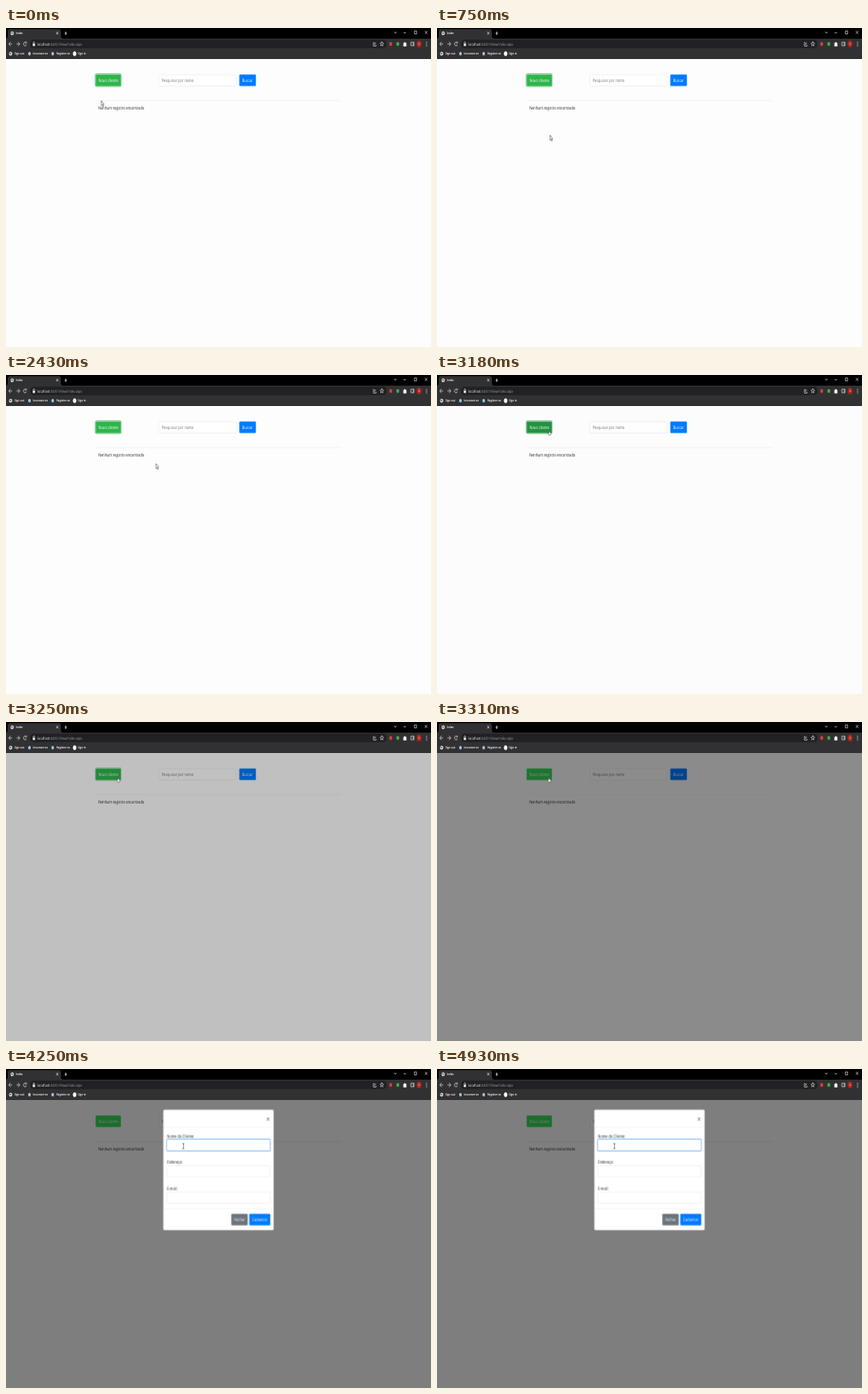
An HTML page that plays this animation: 480 by 360 pixels, repeating every 5060 ms.

```html
<!DOCTYPE html>
<html lang="pt">
<head>
<meta charset="utf-8">
<title>Index</title>
<style>
  html, body { margin: 0; width: 100%; height: 100%; overflow: hidden; background: #000; }
  svg { display: block; width: 100%; height: 100%; }
  text { font: 15.3px "Open Sans", "Noto Sans", sans-serif; text-rendering: geometricPrecision; fill: #212529; }
  .bar text { font-size: 11.4px; font-weight: 600; fill: #fff; }
  .bar .url { font-size: 13.3px; font-weight: 400; }
  .line { fill: none; stroke: #f1f3f4; stroke-width: 2; }
  .field { fill: #fff; stroke: #ced4da; }
  .hint { fill: #6c757d; }
  .on { fill: #fff; }
  .rule { stroke: #dee2e6; }
</style>
</head>
<body>
<!-- A 1920 x 1080 desktop squeezed onto the stage -->
<svg viewBox="0 0 1920 1080" preserveAspectRatio="none">
  <defs>
    <g id="globe">
      <circle r="7" fill="#f1f3f4"/>
      <path d="M-5 -2L1 -3 0 2 3 5" fill="none" stroke="#313133" stroke-width="2.5"/>
    </g>
  </defs>

  <rect y="105" width="1920" height="975" fill="#fdfdfd"/>
  <rect id="ring" x="403.4" y="155.4" width="117.2" height="42.7" rx="5.6" fill="none" stroke="#48b461" stroke-opacity=".75" stroke-width="3.2"/>
  <g id="page">
    <rect class="field" x="690.5" y="158.5" width="349" height="38" rx="4"/>
    <text class="hint" x="703" y="183">Pesquisar por nome</text>
    <path d="M405 246H1515" stroke="#000" stroke-opacity=".1" stroke-width="1.5"/>
    <text x="417" y="277">Nenhum registro encontrado</text>
  </g>

  <rect id="shade" y="105" width="1920" height="975"/>

  <g id="modal">
    <rect x="710.5" y="137.5" width="499" height="408" rx="5" fill="#fff" stroke="#000" stroke-opacity=".2"/>
    <path d="M1179 164l10 11M1189 164l-10 11" stroke="#444" stroke-width="2"/>
    <path class="rule" d="M711 196.5H1209M711 472.5H1209"/>
    <g id="form"></g>
    <g id="focus" fill="none">
      <rect x="724.4" y="236.4" width="471.2" height="42.2" rx="5.6" stroke="#007bff" stroke-opacity=".25" stroke-width="3.2"/>
      <rect x="726.5" y="238.5" width="467" height="38" rx="4" stroke="#80bdff" stroke-width="1.6"/>
    </g>
    <path id="caret" d="M740 249V267" stroke="#333" stroke-width="1.5"/>
  </g>

  <g class="bar">
    <rect width="1920" height="37"/>
    <path d="M0 36Q8 36 8 28V12Q8 4 16 4H240Q248 4 248 12V28Q248 36 256 36H1920V105H0Z" fill="#313133"/>
    <use href="#globe" x="28" y="18"/>
    <text x="45" y="22">Index</text>
    <path class="line" d="M227 13l9 9m0 -9l-9 9M264 18h12m-6 -6v12"/>
    <path class="line" d="M1754 13l5 5 5-5M1796 16h11M1845 10h10v10h-10ZM1893 10l10 10m0 -10l-10 10"/>

    <rect x="108" y="40" width="1612" height="28" rx="14" fill="#202124"/>
    <path class="line" d="M28 54H14m6 -7l-7 7 7 7M47 54h14m-6 -7l7 7-7 7M91 50a6.5 6.5 0 1 0 1 6m0 -10v5h-6"/>
    <path class="line" d="M123 53v-3a3 3 0 0 1 6 0v3"/>
    <rect x="121" y="53" width="10" height="8" fill="#f1f3f4"/>
    <text class="url" x="142" y="59">localhost<tspan fill="#9aa0a6">:44351/View/Index.aspx</tspan></text>
    <path class="line" d="M1665 49h-5v12h12v-4m-8 0q1 -6 8 -6"/>
    <path id="star" class="line"/>
    <path d="M1795 50h4a3 3 0 0 1 6 0h4v12h-14Z" fill="#f1f3f4"/>
    <path class="line" d="M1829 48h14v12h-14Zm11 0v12"/>
    <circle cx="1738" cy="54" r="7" fill="#d93a35"/>
    <circle cx="1770" cy="54" r="7" fill="#45a34a"/>
    <circle cx="1866" cy="54" r="11" fill="#b3261e"/>
    <text x="1863" y="58">L</text>
    <path d="M1900 47v15" stroke="#f1f3f4" stroke-width="3" stroke-dasharray="3"/>

    <use href="#globe" x="21" y="87"/>
    <text x="38" y="91">Sign out</text>
    <circle cx="106" cy="87" r="6" fill="#9cc9dc"/>
    <text x="122" y="91">Inscrever-se</text>
    <circle cx="211" cy="87" r="6" fill="#9cc9dc"/>
    <text x="228" y="91">Register-se</text>
    <circle cx="310" cy="87" r="8" fill="#fff"/>
    <text x="325" y="91">Sign in</text>
  </g>

  <g id="mouse" stroke="#000" stroke-width="1.3" fill="#fff">
    <path id="arrow" d="M0 0V17L4 13.5 7 20 10 18.5 7 12.5H12Z"/>
    <path id="hand" d="M-2 0H1V7L8 9V14L6 18H-1L-6 11H-2Z"/>
    <path id="beam" d="M-4 -9Q0 -9 0 -6Q0 -9 4 -9M0 -7V7M-4 9Q0 9 0 6Q0 9 4 9" fill="none" stroke="#222" stroke-width="2"/>
  </g>
</svg>
<script>
const LOOP = 5060;
const $ = id => document.getElementById(id);
const add = (id, svg) => $(id).insertAdjacentHTML("beforeend", svg);

const button = (id, x, y, w, fill, label) => `
  <rect id="${id}" x="${x}" y="${y}" width="${w}" height="39.5" rx="4" fill="${fill}"/>
  <text class="on" x="${x + 13}" y="${y + 25}">${label}</text>`;

add("page", button("new", 405, 157, 114, "#2fb54b", "Novo cliente")
  + button("find", 1054, 157, 75, "#007bff", "Buscar"));
add("modal", button("close", 1018, 490, 74, "#6c757d", "Fechar")
  + button("save", 1099, 490, 95, "#007bff", "Cadastrar"));

["Nome do Cliente:", "Endereço:", "E-mail:"].forEach((label, i) => {
  const y = 238.5 + i * 89;
  add("form", `<text x="727" y="${y - 7}">${label}</text>
    <rect class="field" x="726.5" y="${y}" width="467" height="38" rx="4"/>`);
});

const tips = Array.from({ length: 10 }, (_, i) => {
  const r = i % 2 ? 4 : 8, a = i * Math.PI / 5;
  return [1698 + r * Math.sin(a), 54 - r * Math.cos(a)];
});
$("star").setAttribute("d", `M${tips.join("L")}Z`);

// Steps are [time, value]; the last value lasts until the loop ends
function anim(id, prop, steps, easing = "linear") {
  const last = steps[steps.length - 1][1];
  const frames = [...steps, [LOOP, last]].map(([t, v]) => ({ offset: t / LOOP, [prop]: v, easing }));
  $(id).animate(frames, { duration: LOOP, iterations: Infinity });
}
const toggle = (id, steps) => anim(id, "opacity", steps, "step-end");
const fade = (id, from, span, a, b) =>
  anim(id, "opacity", [[0, a], [from, a], [from + span, b]]);
const at = (t, x, y) => [t, `translate(${x * 4}px, ${y * 3}px)`];

const OVER = 3060, CLICK = 3180, OPEN = 3325, FOCUS = 3900;

anim("mouse", "transform", [
  at(0, 107.7, 82), at(560, 127, 121), at(1430, 134, 120.5), at(1620, 134, 120.5),
  at(1810, 152, 146), at(2430, 169.5, 100), at(OVER, 127, 62), at(OPEN, 126.3, 61.8),
  at(3620, 185, 93), at(FOCUS, 200.3, 87)
], "ease-in-out");
toggle("arrow", [[0, 1], [OVER, 0], [OPEN, 1], [3600, 0]]);
toggle("hand", [[0, 0], [OVER, 1], [OPEN, 0]]);
toggle("beam", [[0, 0], [3600, 1]]);

anim("new", "fill", [
  [0, "#2fb54b"], [OVER - 1, "#2fb54b"], [OVER, "#259240"], [CLICK, "#259240"], [OPEN, "#38dc5a"]
]);
fade("ring", CLICK, 145, 1, 0);
fade("shade", CLICK, 145, 0, 0.5);
fade("modal", OPEN, 150, 0, 1);
anim("modal", "transform", [
  [0, "translateY(-50px)"], [OPEN, "translateY(-50px)"], [OPEN + 290, "translateY(0px)"]
], "ease-out");
fade("focus", FOCUS, 150, 0, 1);
toggle("caret", [[0, 0], [FOCUS, 1], [FOCUS + 500, 0], [FOCUS + 1000, 1]]);
</script>
</body>
</html>
```
